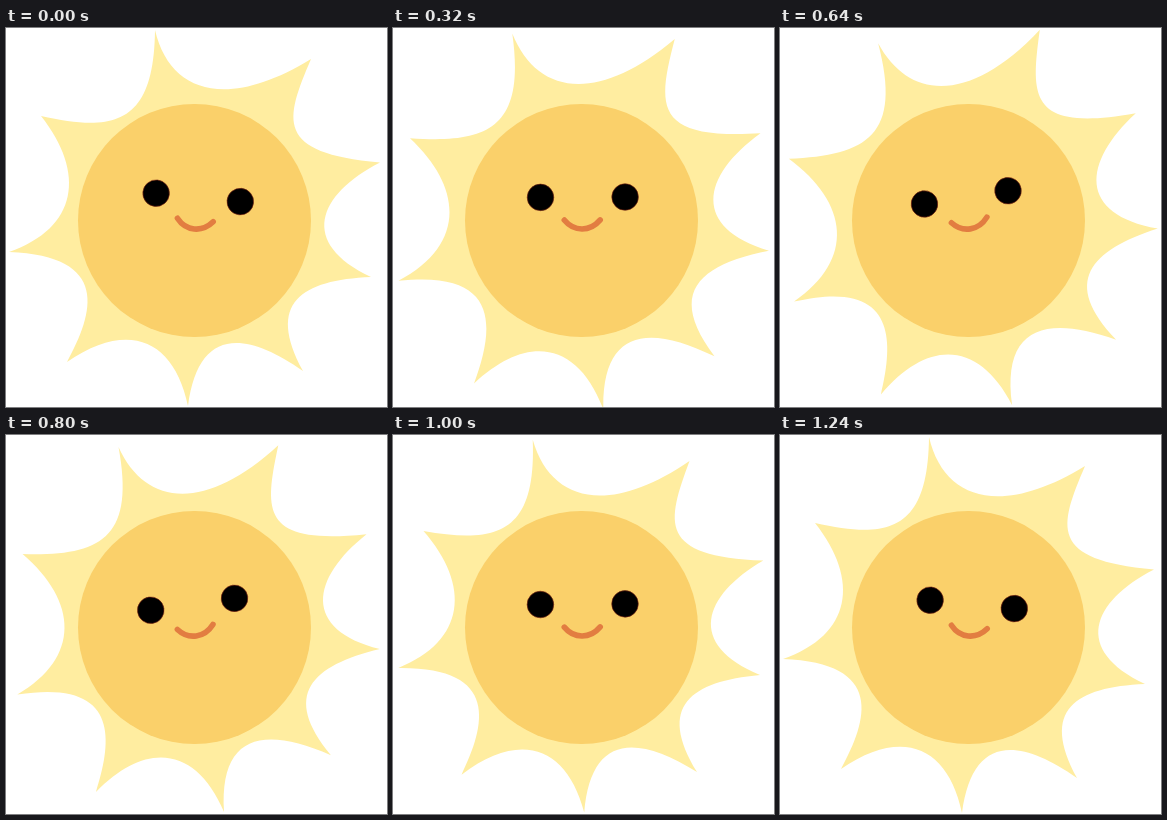
Recreate the animation shown at these times as an HTML page without scripts. Size 381 px wide and 379 px high, loop 1280 ms.

```html
<!DOCTYPE html>
<html lang="en">
<head>
<meta charset="utf-8">
<title>Smiling sun</title>
<style>
  html, body { margin: 0; width: 100%; height: 100%; overflow: hidden; background: #fff; }
  svg { display: block; width: 100%; height: 100%; }

  .rays, .face {
    --sway: cubic-bezier(.37, 0, .63, 1);
    transform-origin: 188.5px 192.5px;
  }
  .rays {
    fill: #ffeda0;
    animation: turn 1280ms var(--sway) infinite, swell 1280ms var(--sway) infinite;
  }
  .disc { fill: #fad06a; }
  .face {
    transform-origin: 189px 192.5px;
    animation: tilt 1280ms var(--sway) infinite;
  }
  .eye { stroke: #7a2412; stroke-width: .6; }
  .mouth { fill: none; stroke: #e27d41; stroke-width: 5.6; stroke-linecap: round; }

  @keyframes turn {
    0%, 90.6%, 100% { rotate: 0deg; }
    46.9% { rotate: -15.5deg; }
  }
  @keyframes swell {
    0%, 97%, 100% { scale: 1; }
    36% { scale: 1.031; }
    78% { scale: .997; }
  }
  /* The face trails slightly behind the rays. */
  @keyframes tilt {
    0%, 2.3%, 96.9%, 100% { rotate: 5.7deg; }
    54.7% { rotate: -9.3deg; }
  }
</style>
</head>
<body>
<svg viewBox="0 0 381 379" role="img" aria-label="Smiling sun">
  <path class="rays" d="M149 2
    C164 66 222 82 305 31
    C279 92 268 125 374 134.5
    C311 167 293 215 365 249
    C295 252 260 275 297 343
    C235 300 192 303 182 378
    C168 311 122 292 61 334
    C88 285 105 228 3 224
    C72 200 80 145 35 88
    C110 105 148 95 149 2Z"/>
  <circle class="disc" cx="188.5" cy="192.5" r="116.5"/>
  <g class="face">
    <circle class="eye" cx="147.6" cy="169.2" r="13.3"/>
    <circle class="eye" cx="232.2" cy="169.2" r="13.3"/>
    <path class="mouth" d="M171.3 192C181 204 197 204 207.2 192"/>
  </g>
</svg>
</body>
</html>
```
